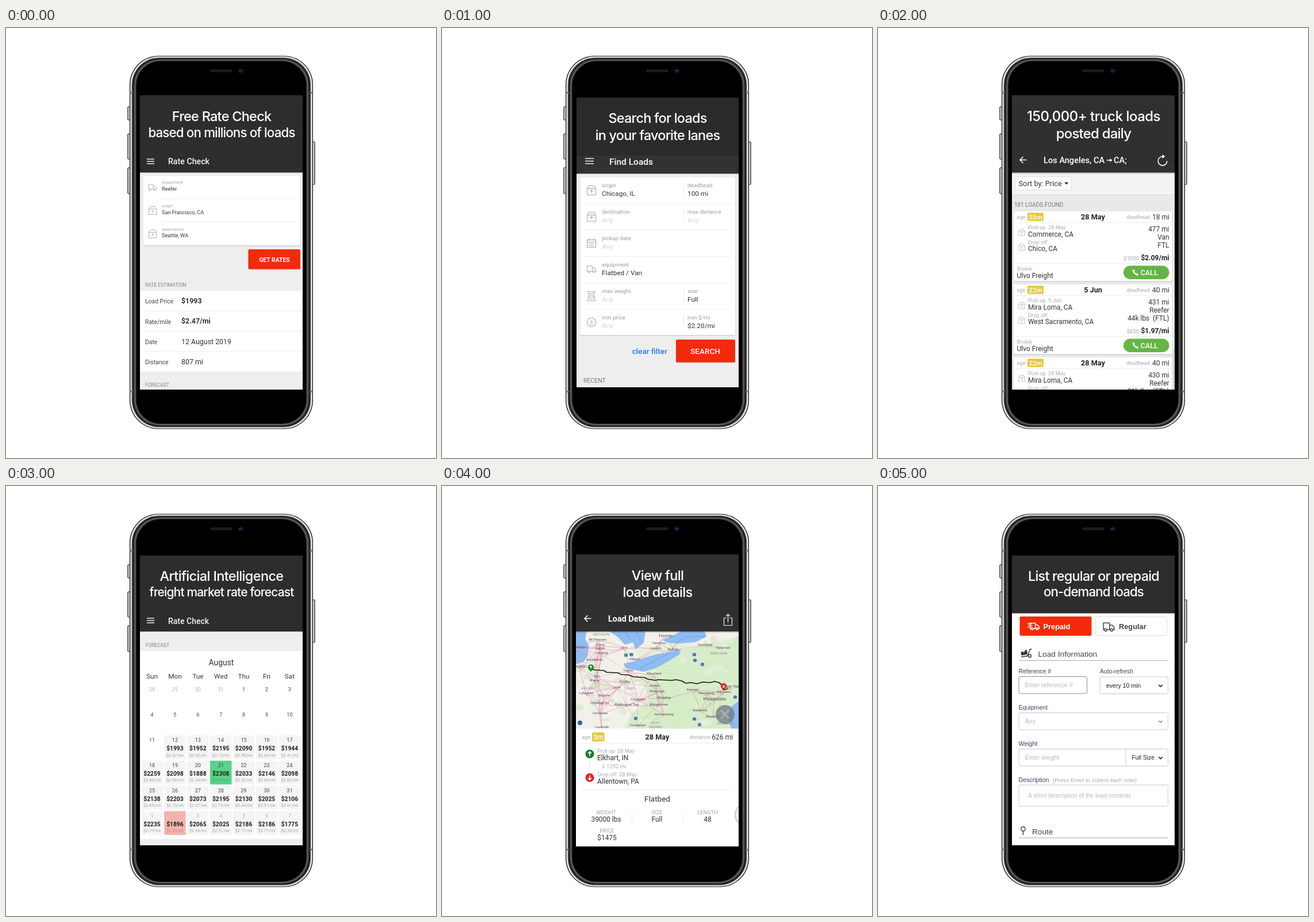
Animation of 748x748 px, one loop 6 s. Source, as an HTML page:

```html
<!DOCTYPE html>
<html lang="en">
<head>
<meta charset="utf-8">
<title>Freight app tour</title>
<style>
html, body { margin: 0; width: 100%; height: 100%; overflow: hidden; background: #fff; }
svg { display: block; width: 100%; height: 100%; font-family: Roboto, sans-serif; }
.head { font-family: Inter, sans-serif; font-weight: 500; font-optical-sizing: none; fill: #fff; text-anchor: middle; }
.form { font-family: "Liberation Sans", Arial, sans-serif; }
</style>
</head>
<body>
<svg id="stage" viewBox="0 0 748 748" xmlns="http://www.w3.org/2000/svg"></svg>
<script>
const HOLD = 1000, RED = '#f32a0b', MID = 375;

// Drawing helpers
const text = (s, x, y, size, fill = '#333', weight = 400, anchor = 'start') =>
  `<text x="${x}" y="${y}" font-size="${size}" fill="${fill}" font-weight="${weight}" text-anchor="${anchor}">${s}</text>`;
const mid = (s, x, y, size, fill, weight) => text(s, x, y, size, fill, weight, 'middle');
const end = (s, x, y, size, fill, weight) => text(s, x, y, size, fill, weight, 'end');
const rect = (x, y, w, h, fill, r = 0, extra = '') =>
  `<rect x="${x}" y="${y}" width="${w}" height="${h}" rx="${r}" fill="${fill}" ${extra}/>`;
const circle = (x, y, r, fill, extra = '') => `<circle cx="${x}" cy="${y}" r="${r}" fill="${fill}" ${extra}/>`;
const line = (d, color, w = 1, extra = '') => `<path d="${d}" fill="none" stroke="${color}" stroke-width="${w}" ${extra}/>`;
const rule = (x1, x2, y, color = '#eee') => line(`M${x1} ${y}H${x2}`, color);
const at = (x, y, k, body) => `<g transform="translate(${x} ${y}) scale(${k})">${body}</g>`;
const card = (x, y, w, h) =>
  rect(x - .5, y, w + 1, h + 1.5, '#d2d2d2', 2.5) + rect(x, y, w, h, '#fff', 2);
const head = (s, y, size, gap) =>
  `<text class="head" x="${MID}" y="${y}" font-size="${size}" letter-spacing="${gap}">${s}</text>`;
const menu = (x, y, w, gap) => line([0, 1, 2].map(i => `M${x} ${y + i * gap}h${w}`).join(''), '#eee', 1.5);
const back = (x, y) => line(`M${x + 12} ${y}H${x + 1}M${x + 6} ${y - 5.5}L${x + .5} ${y}l5.5 5.5`, '#fff', 1.6);

// Icons
const box = (x, y, k, c = '#aaa') => at(x, y, k,
  line('M.5 5L3 .5H12L14.500 5V15H.5ZM.5 5H14.500M7.500 12.500V7.500M5.300 9.500L7.500 7.300L9.700 9.500', c, 1));
const truck = (x, y, k, c = '#aaa', bg = '#fff', w = 1) => at(x, y, k,
  line('M.5 .5H9V10H.5ZM9 3.500H12.500L15.500 6.500V10H9', c, w) +
  [3.5, 12].map(cx => circle(cx, 10.3, 1.7, bg, `stroke="${c}" stroke-width="${w}"`)).join(''));
const arrow = (x, y, dir, c, r) => circle(x, y, r, c) +
  line(`M${x} ${y + dir * r * .5}V${y - dir * r * .5}M${x - r * .4} ${y - dir * r * .1}L${x} ${y - dir * r * .52}L${x + r * .4} ${y - dir * r * .1}`, '#fff', r / 4.5);
const chevron = (x, y, c) => line(`M${x - 3.2} ${y - 1.600}l3.200 3.200l3.200 -3.200`, c, 1.6);

function rateCheck() {
  const fields = [['equipment', 'Reefer'], ['origin', 'San Francisco, CA'], ['destination', 'Seattle, WA']];
  const rows = [['Load Price', '$1993', 700], ['Rate/mile', '$2.47/mi', 700], ['Date', '12 August 2019', 400], ['Distance', '807 mi', 400]];
  return rect(233, 117, 283, 512, '#eee') + rect(233, 117, 283, 134.5, '#2d2d2d') +
    head('Free Rate Check', 161.5, 23.5, -.75) + head('based on millions of loads', 189.5, 22.3, -.84) +
    menu(245, 228, 13, 4) + text('Rate Check', 282, 237.3, 14.2, '#f2f2f2', 500) +
    card(238.5, 257, 273.5, 121) +
    fields.map(([k, v], i) => text(k, 271, 271 + i * 40.8, 7.8, '#aaa') + text(v, 271, 283 + i * 40.6, 9.15, '#333') +
      (i ? rule(271, 508, 256.5 + i * 40.6) + box(248, 269.7 + i * 40.5, .95) : truck(247.5, 271.5, .95))).join('') +
    rect(421.5, 385.5, 90.5, 35, '#cfcfcf', 2) + rect(421.5, 385, 90.5, 34.5, RED, 2) +
    mid('GET RATES', 467, 406.7, 10.4, '#fff', 700) +
    text('RATE ESTIMATION', 242, 450, 8.5, '#858585') + rect(233, 457.5, 283, 140, '#fff') +
    rows.map(([k, v, w], i) => text(k, 242, 479.3 + i * 35.2, 10.4, '#444') + text(v, 305, 479.3 + i * 35.1, 12.4, '#333', w) +
      (i ? rule(242, 516, 457.5 + i * 35) : '')).join('') +
    text('FORECAST', 242, 624, 8.5, '#858585');
}

function findLoads() {
  const rows = [['origin', 'Chicago, IL', 'deadhead', '100 mi'], ['destination', 'Any', 'max distance', 'Any'], ['pickup date', 'Any'],
    ['equipment', 'Flatbed / Van'], ['max weight', 'Any', 'size', 'Full'], ['min price', 'Any', 'min $/mi', '$2.20/mi']];
  const pair = (k, v, x, y) => text(k, x, y, 9.9, '#9b9b9b') + text(v, x, y + 15, 11.8, v === 'Any' ? '#d4d4d4' : '#333');
  const c = '#aaa';
  const icons = [
    box(252, 274, 1.08), box(252, 320, 1.08),
    line('M252.500 368.500H267.500V381.500H252.500ZM252.500 372.500H267.500M256 366V370M264 366V370M255.500 375.500H264.500M255.500 378.500H264.500', c, 1.2),
    truck(252, 413.500, 1.02),
    line('M253.500 458.500H266.500L264.500 462H255.500ZM256 462L253.500 474.500H266.500L264 462', c, 1.1) + circle(260, 468.3, 3.6, '#fff', `stroke="${c}"`) + line('M260 468.500L261.500 466.500', c),
    circle(260, 512, 7.7, 'none', `stroke="${c}" stroke-width="1.1"`) + mid('$', 260, 515.5, 9.5, c)];
  return rect(234, 121, 282, 504, '#eee') + rect(234, 121, 282, 101, '#2b2b2b') + rect(234, 222, 282, 31.5, '#323232') +
    head('Search for loads', 165, 23.5, -.8) + head('in your favorite lanes', 194.5, 23.5, -.83) +
    menu(249, 227, 15, 4.5) + text('Find Loads', 291, 237.5, 15.5, '#fff', 500) +
    card(240.5, 260, 269.5, 274) +
    rows.map(([k, v, k2, v2], i) => {
      const y = 277 + i * 46;
      return pair(k, v, 278, y) + (k2 ? pair(k2, v2, 427, y) + line(`M420.500 ${y - 9}v26`, '#eee') : '') +
        (i ? rule(246, 505, y - 17.5) : '') + icons[i];
    }).join('') +
    text('clear filter', 330.5, 567, 13.6, '#2079f2', 500) +
    rect(407, 543, 103, 40, '#cfcfcf', 2) + rect(407, 542, 103, 39.5, RED, 2) + mid('SEARCH', 458, 567, 13.5, '#fff', 500) +
    text('RECENT', 246, 617, 10.5, '#7c7c7c');
}

function loadList() {
  const loads = [
    ['55m', '28 May', '18 mi', 'Commerce, CA', 'Chico, CA', ['477 mi', 'Van', 'FTL'], '$1000', '$2.09/mi'],
    ['22m', '5 Jun', '40 mi', 'Mira Loma, CA', 'West Sacramento, CA', ['431 mi', 'Reefer', '44k lbs&#160; (FTL)'], '$850', '$1.97/mi'],
    ['22m', '28 May', '40 mi', 'Mira Loma, CA', 'Chico, CA', ['430 mi', 'Reefer', '31k lbs&#160; (FTL)'], '$850', '$1.97/mi']];
  const item = ([age, day, dead, from, to, facts, price, rate], i) => at(0, i * 127, 1,
    card(236, 319, 275.5, 121) + text('age', 241, 332, 9.2, '#aaa') +
    rect(260, 321.3, 28, 14.5, '#e6c93f', 2) + mid(age, 274, 332.7, 11.8, '#fff', 500) +
    mid(day, 374, 333, 12.7, '#222', 700) + end('deadhead', 473, 332, 9.3, '#aaa') + end(dead, 507, 333, 12) +
    rule(236, 511.5, 338.5) +
    text('Pick up&#160; ' + day, 261, 350.3, 9.3, '#aaa') + text(from, 261, 362.5, 11.9) + box(244.5, 350, .74) +
    text('Drop off', 261, 376, 9.3, '#aaa') + text(to, 261, 388, 11.9) + box(244.5, 375.5, .74) +
    facts.map((f, j) => end(f, 506.5, 353.500 + j * 14, 11.9)).join('') +
    end(price, 454, 403.5, 9.6, '#aaa') + end(rate, 506.5, 404, 12, '#222', 700) +
    rule(236, 511.5, 409.5) + text('Broker', 241.5, 422.3, 9.5, '#aaa') + text('Ulvo Freight', 241.5, 434.5, 12) +
    rect(427, 413.5, 79.500, 23.5, '#65b545', 11.75) + text('CALL', 456.5, 429.8, 12.8, '#fff', 500) +
    line('M444 421.500Q445 427.500 452 429.500', '#fff', 2.2) + line('M443.300 420.500l2.500 3M449.500 427.500l3 2.500', '#fff', 3.2));
  return rect(233, 117, 283, 512, '#e9e9e9') + rect(233, 251, 283, 39, '#f3f3f3') + rule(233, 516, 290.5, '#dcdcdc') +
    rect(233, 251, 283, 2.5, '#c8c8c8') + rect(233, 117, 283, 134.5, '#303030') +
    head('150,000+ truck loads', 161.5, 24, -.53) + head('posted daily', 192, 24, -.8) +
    back(246.5, 229.5) + text('Los Angeles, CA', 288, 235, 14.6, '#fff', 500) + text('CA;', 410, 235, 14.6, '#fff', 500) +
    line('M398 230H406M403.500 227.500L406.500 230L403.500 232.500', '#fff', 1.3) +
    line('M495 223.500A7.800 7.800 0 1 0 502.800 231.300', '#fff', 1.6) + '<path d="M494.500 220l5 3.500l-5 3.500z" fill="#fff"/>' +
    rect(238.5, 258.5, 98, 23, '#fff', 2, 'stroke="#dedede"') + text('Sort by: Price', 244.5, 275, 12.8) +
    '<path d="M324 268.500h7.500l-3.750 4z" fill="#333"/>' +
    text('181 LOADS FOUND', 237, 310.5, 10, '#777') + loads.map(item).join('') + rect(513, 559, 2, 70, '#d2d2d2');
}

function forecast() {
  const prices = [1993, 1952, 2195, 2090, 1952, 1944, 2259, 2098, 1888, 2308, 2033, 2146, 2098, 2138, 2203, 2073, 2195,
    2130, 2025, 2106, 2235, 1896, 2065, 2025, 2186, 2186, 1775];
  const miles = 807, first = 15, best = 24, worst = 36;
  let out = rect(233, 121, 283, 504, '#fff') + rect(233, 121, 283, 132.5, '#2d2d2d') +
    head('Artificial Intelligence', 165, 23.5, -.64) + head('freight market rate forecast', 191.5, 21, -.85) +
    menu(245, 230, 13, 4) + text('Rate Check', 282, 239.5, 14, '#f2f2f2', 500) +
    rect(233, 253.5, 283, 33.5, '#eee') + text('FORECAST', 243, 279.5, 8.4, '#858585') + mid('August', 374.5, 312, 13.9) +
    rect(233, 614, 283, 11, '#eee');
  'Sun Mon Tue Wed Thu Fri Sat'.split(' ').forEach((d, i) => out += mid(d, 254 + i * 39.9, 335, 11.8));
  for (let i = 0; i < 42; i++) {
    const x = 254 + i % 7 * 39.9, y = 357 + Math.floor(i / 7) * 43.9, price = prices[i - first];
    const day = i < 4 ? 28 + i : (i - 4) % 31 + 1, other = i < 4 || i > 34;
    if (price) {
      const fill = i === best ? '#58d387' : i === worst ? '#f4b3ae' : '#f5f5f5';
      out += rect(x - 18.8, y - 11, 37.6, 41.5, fill, 2) + mid('$' + price, x, y + 15, 10.3, '#222', 700) +
        mid(`$${(price / miles).toFixed(2)}/mi`, x, y + 25.7, 7.4, i === best ? '#46a86c' : i === worst ? '#c08d89' : '#a3a3a3');
    }
    out += mid(day, x, y, 9, other ? '#b5b5b5' : '#444');
  }
  return out;
}

function map() {
  const places = `Mt Pleasant 271 268|Grand 275 277|Rapids 275 283|Lansing 278 291|Flint 317 282|Muskegon 238 281|Kalamazoo 266 303
|Detroit 335 302|Toronto 389 262|Hamilton 378 274|London 372 283|Buffalo 402 285|Rochester 458 277|Syracuse 489 282|Chicago 239 315
|Fort 270 332|Wayne, 266 339|Toledo 324 322|Cleveland 369 327|Findlay 318 341|Lima 304 351|Canton 370 348|Pittsburgh 374 358
|Muncie 282 365|Lafayette 251 361|Indianapolis 275 378|Columbus 341 372|Washington Twp 321 381|Wheeling 386 369|Morgantown 377 381
|Cincinnati 275 396|Louisville 278 420|Charleston 340 417|Kearney 436 355|Harrisburg 460 361|Philadelphia 474 372
|Allentown 490 359|New York 505 350|Baltimore 449 391|Washington 474 402|Harrisonburg 386 398`.split('|').map(s => {
    const [, name, x, y] = s.trim().match(/^(.+) (\d+) (\d+)$/);
    return { name, x: +x, y: +y };
  });
  const states = [['MICHIGAN', 277, 260], ['INDIANA', 254, 354], ['OHIO', 327, 354], ['NEW YORK', 482, 293], ['WEST', 371, 414], ['VIRGINIA', 371, 420.500], ['DELAWARE', 493, 415]];
  const big = /Toronto|Philadelphia|Chicago|New York/;
  let seed = 11;
  const rnd = () => (seed = seed * 16807 % 2147483647) / 2147483647;
  let out = rect(233, 253, 283, 169, '#f3f0ea');
  out += '<path d="M356 300L420 284L516 262V422H318L330 395L360 372L352 345Z" fill="#d6edc8"/><path d="M330 284L405 272L440 275L405 290L350 305Z" fill="#e6efd9"/>';
  for (let i = 0; i < 70; i++) {
    const x = 234 + rnd() * 282, y = 255 + rnd() * 166;
    out += `<ellipse cx="${x}" cy="${y}" rx="${3 + rnd() * 9}" ry="${2 + rnd() * 5}" fill="${rnd() < .6 ? '#d3ebc4' : '#e7efdc'}" opacity=".7"/>`;
  }
  out += '<g fill="#8fbcf2"><path d="M233 253H252L249 266L256 278L253 296L246 306L233 310Z"/><path d="M291 253H354L351 273L337 284L332 272L318 276L306 263Z"/><path d="M319 317L316 309L334 305L352 299L372 293L398 288L416 283L413 293L392 306L372 317L350 323Z"/><path d="M394 273L383 268L402 260L415 253H457L460 262L440 272L410 274Z"/><path d="M516 374L504 383L497 400L503 422H516Z"/></g>' +
    line('M318 253L329 268M338 253L347 270M345 317L395 291L410 271L425 262H458', '#6d8fc9', .7);
  places.forEach((a, i) => places.slice(i + 1).forEach(b => {
    if (Math.hypot(a.x - b.x, a.y - b.y) < 58 && !(a.x > 330 && a.y < 303 && b.y > 303))
      out += line(`M${a.x} ${a.y + 2}Q${(a.x + b.x) / 2 + rnd() * 12 - 6} ${(a.y + b.y) / 2 + rnd() * 12 - 6} ${b.x} ${b.y + 2}`, rnd() < .5 ? '#e58fae' : '#dfb0c4', .7);
  }));
  places.forEach(p => out += mid(p.name, p.x, p.y + 1, big.test(p.name) ? 7.2 : 5.8, '#4c4a50'));
  states.forEach(([s, x, y]) => out += mid(s, x, y, 6, '#98869c'));
  [[320, 294], [329.5, 293], [439, 293], [440, 303], [453, 310], [439, 405], [448, 415], [510, 367], [337, 404]].forEach(([x, y], i) =>
    out += rect(x - 3.5, y - 3, 7, 6.5, i ? '#527bb8' : '#3c9a72', 2, 'stroke="#fff" stroke-width=".6"'));
  out += line('M259 319L267 320L282 321L286 324L306 325L312 328L326 329L333 332L352 333L358 336L371 338L376 337L399 338L408 337L417 339L424 343L434 342L443 344L454 341L466 342L474 340L482 342L488 347L492 353', '#171717', 1.7, 'stroke-linejoin="round"');
  out += '<path d="M255 318l4 5l4 -5z" fill="#158324"/><path d="M486 350l4 5l4 -5z" fill="#e61f2b"/>' +
    arrow(259, 315.5, 1, '#158324', 5.2) + arrow(490, 348, -1, '#e61f2b', 5.2) + line('M488 354h6l4 -3', '#222', 1.4);
  out += circle(240, 412, 4, '#2864ac') + circle(492.5, 397.5, 16.5, '#747b80', 'opacity=".78"') +
    line('M485 390L499 404M499 390L485 404', '#a8b4bd', 2.5);
  return `<g clip-path="url(#map)">${out}</g>`;
}

function loadDetails() {
  const cell = (k, v, x, y) => mid(k, x, y, 9.4, '#a5a5a5') + mid(v, x, y + 13, 11.9);
  return rect(233, 119, 283, 508, '#fff') + rect(233, 119, 283, 134, '#303030') +
    head('View full', 163.5, 23.5, -.68) + head('load details', 193, 23.5, -.65) +
    back(247.5, 230.5) + text('Load Details', 289, 236.3, 14.4, '#fff', 700) +
    line('M494.500 229.500H490.500V242.500H504.500V229.500H500.500M497.500 237V223M494 226.500L497.500 223L501 226.500', '#eee', 1.2) +
    map() + rect(233, 253, 283, 2, '#0003') +
    text('age', 243, 440, 9.2, '#aaa') + rect(261, 428.5, 21.5, 16, '#e6c93f', 2) + mid('3m', 271.7, 441, 12, '#fff', 500) +
    mid('28 May', 374.5, 441.2, 12.7, '#222', 700) + end('distance', 467, 440, 9.5, '#aaa') + end('626 mi', 506, 441, 12) +
    rule(245, 505, 447.5, '#ededed') +
    arrow(257, 466, 1, '#128020', 7.5) + line('M256.500 479v12', '#ddd') + arrow(257, 507.3, -1, '#ed1c2b', 7.5) +
    text('Pick up&#160; 28 May', 270, 464, 9.3, '#aaa') + text('Elkhart, IN', 270, 477, 12) +
    line('M281 483.500V490.500M278.500 488L281 490.500L283.500 488', '#aaa', .9) + text('1252 mi', 286, 491, 9.5, '#aaa') +
    text('Drop off&#160; 28 May', 270, 505, 9.3, '#aaa') + text('Allentown, PA', 270, 518, 12) +
    rule(245, 505, 528.5, '#ededed') + mid('Flatbed', 374.5, 549, 13.5) +
    cell('WEIGHT', '39000 lbs', 285.500, 571) + cell('SIZE', 'Full', 374, 571) + cell('LENGTH', '48', 462, 571) + cell('PRICE', '$1475', 287, 603) +
    line('M330.500 570v14M418.500 570v14', '#e6e6e6') + line('M516 557.500Q504 572 516 586.500', '#d4d4d4', 3);
}

function listing() {
  const navy = '#37435f', hint = '#b9b9b9';
  const field = (x, y, w, h, c = '#c9c9c9') => rect(x + .5, y + .5, w, h, '#fff', 2, `stroke="${c}"`);
  const t = text;
  return `<g class="form">` + rect(233, 121, 283, 504, '#fff') + rect(233, 121, 283, 100.5, '#2d2d2d') +
    head('List regular or prepaid', 164.5, 23.5, -.83) + head('on-demand loads', 191.5, 22.3, -.9) +
    rect(246.5, 227, 125, 33.5, RED, 2.5) + truck(264.5, 238, 1.02, '#fff', RED, 1.4) +
    line('M260 239.500h7M261.500 242.500h7M260 245.500h7', '#fff', 1.3) + t('Prepaid', 287.5, 249.3, 12.8, '#fff', 700) +
    rect(378, 227.5, 124.5, 33, '#fff', 2.5, 'stroke="#dedede"') + truck(391.5, 237.5, 1.25, '#444', '#fff', 1.2) + t('Regular', 419, 249.3, 12.8, '#444', 700) +
    line('M249 297.500L260 295.500L264.500 284H267.500', '#333', 1.5) + circle(264, 295.5, 2.5, '#fff', 'stroke="#333" stroke-width="1.4"') +
    '<path d="M248.500 289l4 -1.500l1 3l2.500 -5l3 -.5l1 7.500l-10.500 2.500z" fill="#333"/>' +
    t('Load Information', 278.5, 297, 13.7, '#444') + rule(245, 505, 303.5, '#aaa') +
    t('Reference #', 244.5, 325.5, 10.4, navy) + field(244.500, 331, 118.5, 29.5, '#8c8c8c') + t('Enter reference #', 255.5, 350, 10.8, hint) +
    t('Auto-refresh', 386, 326, 10.5, navy) + field(385.500, 331.5, 118.5, 29.5) + t('every 10 min', 397, 351, 10.5, '#222') + chevron(491.5, 347.5, '#222') +
    t('Equipment', 244.5, 389, 10.6, navy) + field(244.500, 394, 259.5, 29.5) + t('Any', 255.5, 413, 10.8, hint) + chevron(491.5, 410, '#999') +
    t('Weight', 244.5, 451.5, 10.6, navy) + field(244.500, 457, 259.5, 29.5) + t('Enter weight', 255.5, 476, 10.8, hint) +
    line('M431 457.500v29.500', '#c9c9c9') + t('Full Size', 441.5, 476.300, 10.3, '#222') + chevron(491.5, 473, '#222') +
    t('Description', 244.5, 514.5, 10.6, navy) + t('(Press Enter to submit each note)', 304, 514.5, 9.8, '#aaa') +
    field(244.500, 519.500, 259.5, 37) + t('A short description of the load contents', 261, 542.3, 10.4, hint) +
    circle(252.500, 596.5, 3.7, '#fff', 'stroke="#444" stroke-width="1.5"') + line('M252.500 600.500V607', '#444', 1.6) +
    t('Route', 268, 606, 13.6, '#444') + rule(245, 505, 612, '#aaa') + '</g>';
}

function phone() {
  const rings = [[0, '#111'], [1.3, '#f3f3f3'], [3.2, '#a2a2a2'], [4.6, '#111'], [6.3, '#333'], [8.5, '#626262'], [10.5, '#252525'], [12, '#000']];
  const keys = [[211.5, 137, 23], [211.5, 184, 44], [211.5, 243, 45], [532.5, 198, 74]];
  return keys.map(([x, y, h]) => rect(x + .5, y, 4, h, '#ddd', 1.2, 'stroke="#111" stroke-width="1.2"')).join('') +
    rings.map(([d, c]) => rect(215 + d, 48.5 + d * .8, 319 - 2 * d, 649 - 1.6 * d, c, 50 - d * .7)).join('') +
    [111, 631].map(y => rect(215.5, y, 5, 3, '#777') + rect(528.5, y, 5, 3, '#777')).join('') +
    rect(355, 72, 39, 5, '#1b1b1b', 2.5) + circle(408.5, 74.5, 4.5, '#0c1228') +
    circle(407, 74.3, 1, '#3a5590') + circle(410, 74.3, 1, '#3a5590');
}

const screens = [rateCheck, findLoads, loadList, forecast, loadDetails, listing];
const stage = document.getElementById('stage');
stage.innerHTML = `<defs><clipPath id="screen">${rect(233, 117, 283, 512, '#000')}</clipPath><clipPath id="map">${rect(233, 253, 283, 169, '#000')}</clipPath></defs>` +
  phone() + `<g id="screens" clip-path="url(#screen)">${screens.map(s => `<g visibility="hidden">${s()}</g>`).join('')}</g>`;
const layers = [...document.getElementById('screens').children];

const start = performance.now();
function draw(now) {
  const current = Math.floor(Math.max(0, now - start) / HOLD) % layers.length;
  layers.forEach((g, i) => g.setAttribute('visibility', i === current ? 'visible' : 'hidden'));
  requestAnimationFrame(draw);
}
draw(start);
</script>
</body>
</html>
```
